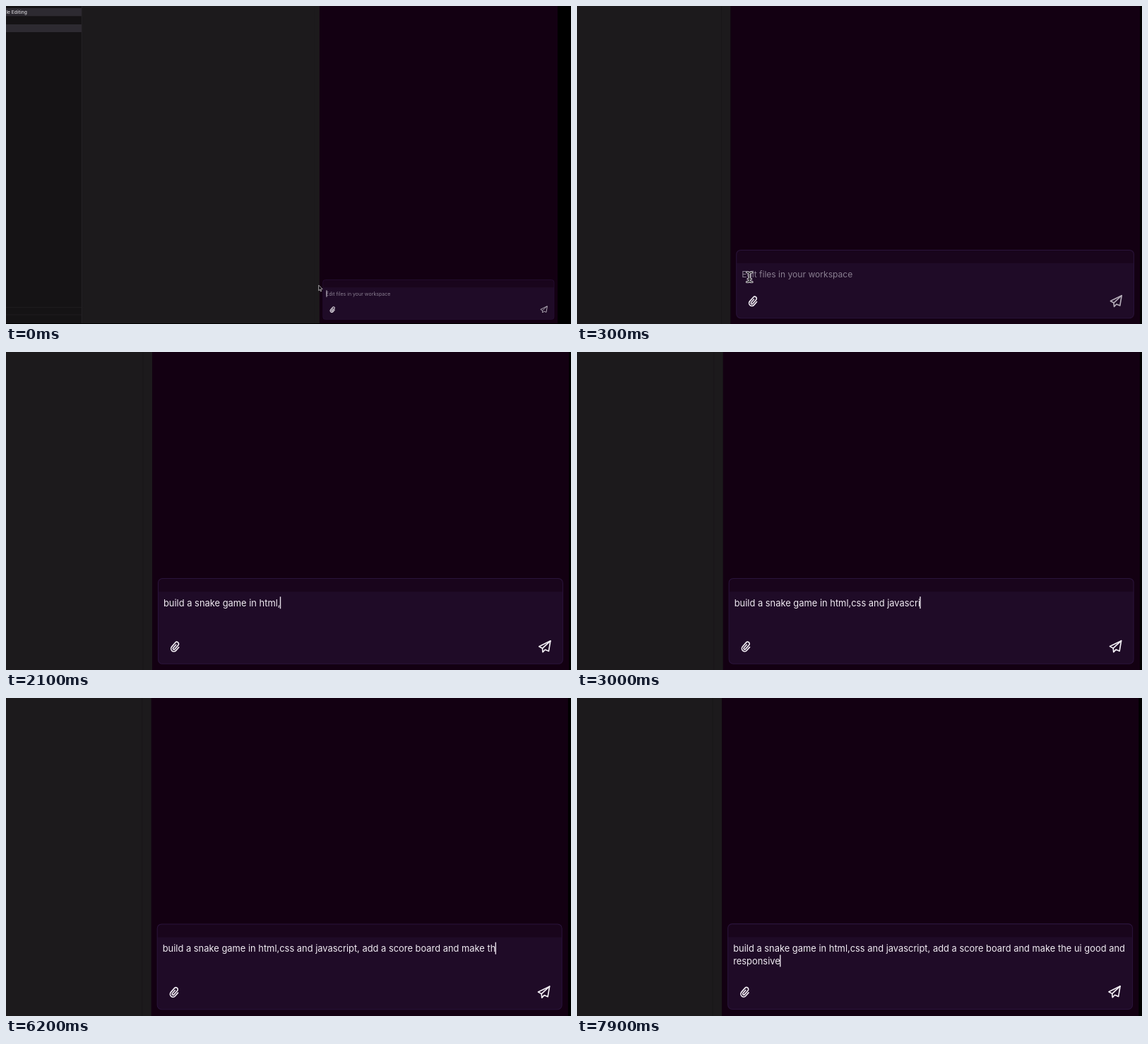
An HTML page with a canvas for the animation above (8 s loop, 800 by 450 pixels).

```html
<!DOCTYPE html>
<html lang="en">
<head>
<meta charset="utf-8">
<title>Prompt typing</title>
<style>
html, body { margin: 0; width: 100%; height: 100%; overflow: hidden; background: #000; }
canvas { display: block; width: 800px; height: 450px; }
</style>
</head>
<body>
<canvas id="stage" width="800" height="450"></canvas>
<script>
const LOOP = 8000;
const FONT = 'Inter, "Open Sans", sans-serif';
const PROMPT = "build a snake game in html,css and javascript, add a score board and make the ui good and responsive";
const WRAP = 90;
// [time in ms, characters typed]
const TYPING = [[600, 0], [2100, 27], [3000, 43], [4500, 51], [6200, 76], [7900, 100]];
const HIDE_MOUSE = 600;

const ctx = document.getElementById("stage").getContext("2d");

const settle = (t, tau) => 1 - Math.exp(-t / tau);

function typedCount(t) {
  if (t <= TYPING[0][0]) return 0;
  for (let i = 1; i < TYPING.length; i++) {
    const [t0, n0] = TYPING[i - 1], [t1, n1] = TYPING[i];
    if (t <= t1) return Math.floor(n0 + (n1 - n0) * (t - t0) / (t1 - t0) + 0.01);
  }
  return PROMPT.length;
}

function rect(x, y, w, h, fill) {
  ctx.fillStyle = fill;
  ctx.fillRect(x, y, w, h);
}

function label(text, x, y, size, fill, weight = 400, align = "left") {
  ctx.font = `${weight} ${size}px ${FONT}`;
  ctx.textAlign = align;
  ctx.fillStyle = fill;
  ctx.fillText(text, x, y);
  return ctx.measureText(text).width;
}

function polyline(points, closed) {
  ctx.beginPath();
  points.forEach(([x, y]) => ctx.lineTo(x, y));
  if (closed) ctx.closePath();
}

function at(x, y, angle, draw) {
  ctx.save();
  ctx.translate(x, y);
  ctx.rotate(angle);
  ctx.lineJoin = ctx.lineCap = "round";
  draw();
  ctx.restore();
}

function workbench() {
  rect(0, 0, 107, 449, "#151315");
  rect(0, 3, 107, 11.3, "#2d2a31");
  rect(0, 26, 107, 11, "#2d2a31");
  label("File Editing", 29.8, 11.3, 6.7, "#d2d0d4", 500, "right");
  rect(0, 426, 107, 0.7, "#221f23");
  rect(0, 436.6, 107, 0.7, "#221f23");
  rect(107, 0, 337, 449, "#1c1a1c");
  rect(106.8, 0, 0.7, 449, "#29262a");
  rect(436.2, 0, 0.5, 449, "#181618");
  rect(443.9, 0, 337.1, 449, "#130012");
}

function paperclip() {
  ctx.strokeStyle = "#f0ecf2";
  ctx.lineWidth = 0.95;
  ctx.beginPath();
  ctx.moveTo(2.3, -1.7);
  ctx.lineTo(2.3, 1.8);
  ctx.arc(0, 1.8, 2.3, 0, Math.PI);
  ctx.lineTo(-2.3, -2.6);
  ctx.arc(-0.75, -2.6, 1.55, Math.PI, 0);
  ctx.lineTo(0.8, 1.7);
  ctx.arc(0, 1.7, 0.8, 0, Math.PI);
  ctx.lineTo(-0.8, -1.7);
  ctx.stroke();
}

function plane(color) {
  ctx.strokeStyle = color;
  ctx.lineWidth = 0.95;
  polyline([[4.6, -4.6], [-4.6, -0.1], [-1.9, 1.4], [-1.6, 4.5], [0.3, 2.5], [3.2, 3.7]], true);
  ctx.stroke();
  polyline([[4.6, -4.6], [-1.9, 1.4]]);
  ctx.stroke();
}

function inputBox(t) {
  const n = typedCount(t);
  const top = n ? 374.5 : 387.5;
  const bottom = 443.5, left = 448.7, width = 327.3;

  ctx.save();
  ctx.beginPath();
  ctx.roundRect(left, top, width, bottom - top, 3.5);
  ctx.clip();
  rect(left, top, width, bottom - top, "#1f0b27");
  rect(left, top, width, 10.7, "#19051c");
  ctx.restore();
  ctx.strokeStyle = "#2a143b";
  ctx.lineWidth = 0.6;
  ctx.beginPath();
  ctx.roundRect(left, top, width, bottom - top, 3.5);
  ctx.stroke();

  const x = 453, base = top + 22.4;
  let caretX = 453.6, caretY = base - 7.7;
  if (n) {
    const size = 7.36, ink = "#f1ecf3";
    // the space before the wrap hangs, so it never moves the caret
    caretX = x + label(PROMPT.slice(0, Math.min(n, WRAP - 1)), x, base, size, ink);
    if (n > WRAP) {
      caretX = x + label(PROMPT.slice(WRAP, n), x, base + 10.3, size, ink);
      caretY += 10.3;
    }
    caretX -= 0.4;
  } else {
    label("Edit files in your workspace", x, base, 7.02, "#897e90");
  }
  if (n || t < 200) rect(caretX, caretY, 0.8, 9.7, "#e9e3ec");

  at(462.6, 429.8, 0.72, paperclip);
  at(761.4, 429.5, 0, () => plane(n ? "#f4f0f6" : "#b4acb8"));
}

function arrow() {
  polyline([[0, 0], [0, 7.4], [1.7, 5.9], [2.9, 8.7], [4, 8.2], [2.8, 5.5], [5, 5.3]], true);
  ctx.fillStyle = "#08060a";
  ctx.fill();
  ctx.strokeStyle = "#d8d6da";
  ctx.lineWidth = 0.75;
  ctx.stroke();
}

function ibeam() {
  const bars = () => {
    ctx.beginPath();
    ctx.moveTo(-2.2, -4); ctx.quadraticCurveTo(0, -4, 0, -2.6);
    ctx.lineTo(0, 2.6); ctx.quadraticCurveTo(0, 4, -2.2, 4);
    ctx.moveTo(2.2, -4); ctx.quadraticCurveTo(0, -4, 0, -2.6);
    ctx.moveTo(2.2, 4); ctx.quadraticCurveTo(0, 4, 0, 2.6);
    ctx.moveTo(-1.3, 1.5); ctx.lineTo(1.3, 1.5);
    ctx.stroke();
  };
  ctx.strokeStyle = "#e6e2e8";
  ctx.lineWidth = 1.8;
  bars();
  ctx.strokeStyle = "#0c080e";
  ctx.lineWidth = 0.7;
  bars();
}

function mouse(t) {
  if (t >= HIDE_MOUSE) return;
  const m = settle(t, 80);
  const x = 442.7 + 17.2 * m, y = 395.3 + 14.8 * m;
  at(x, y, 0, x > 448.5 ? ibeam : arrow);
}

function draw(t) {
  const p = settle(t, 94.5);
  const drift = p * (t - 2100);
  const scale = 1 + 0.7505 * p;
  ctx.setTransform(1, 0, 0, 1, 0, 0);
  rect(0, 0, 800, 450, "#000");
  ctx.setTransform(scale, 0, 0, scale, -570 * p - drift * 0.00031, -335 * p - drift * 0.00016);
  workbench();
  inputBox(t);
  mouse(t);
}

let start = null;
function tick(now) {
  if (start === null) start = now;
  draw((now - start) % LOOP);
  requestAnimationFrame(tick);
}
draw(0);
requestAnimationFrame(tick);
</script>
</body>
</html>
```
